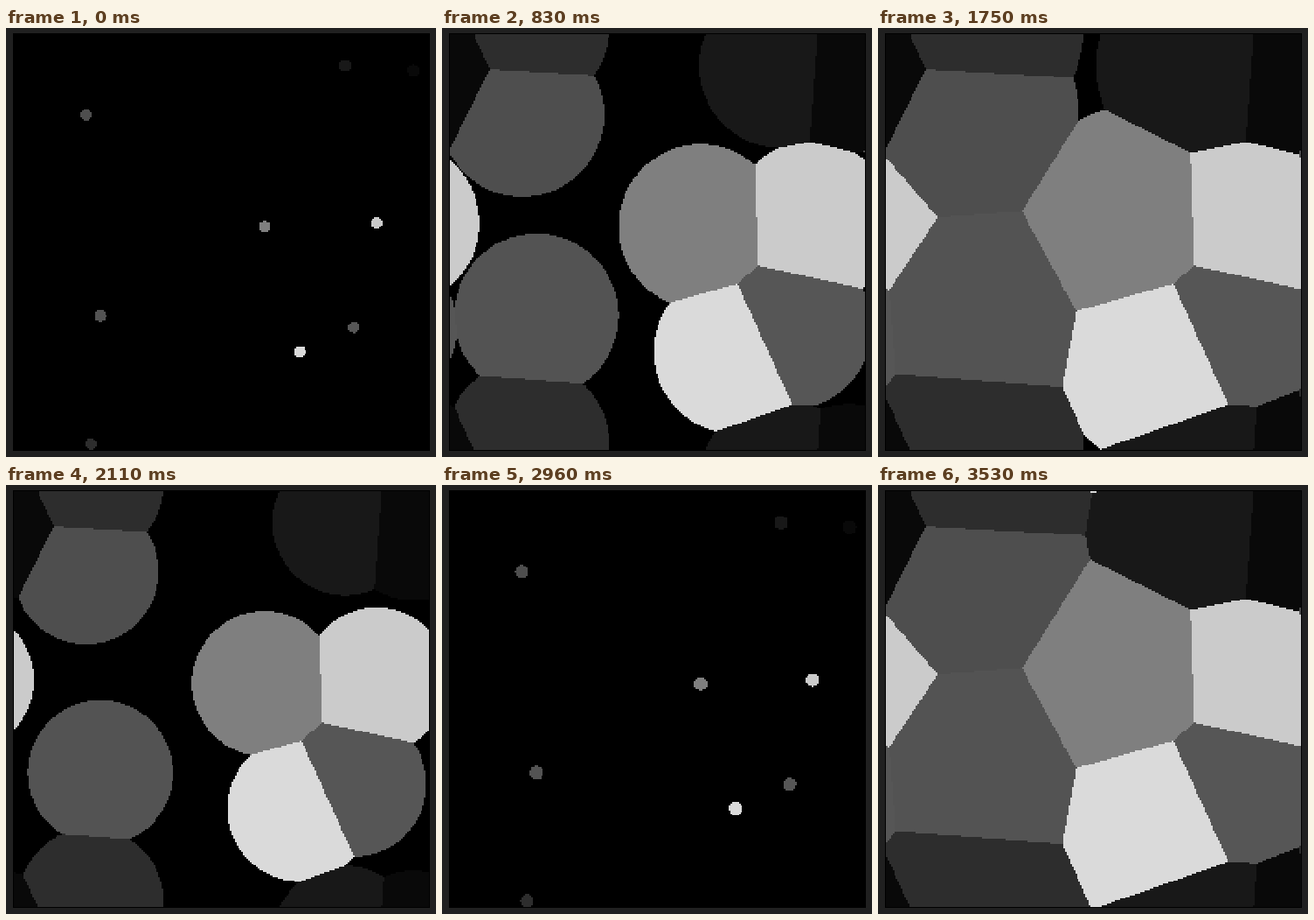
Animation, 492 px wide and 490 px high, one loop 3.89 s. Source, as an HTML page with a canvas:

```html
<!DOCTYPE html>
<html lang="en">
<head>
<meta charset="utf-8">
<title>Growing cells on a torus</title>
<style>
  html, body { margin: 0; width: 100%; height: 100%; overflow: hidden; background: #202020; }
  canvas {
    position: absolute; left: 8px; top: 6px; width: 475px; height: 475px;
    border: 1px solid #000; background: #000; image-rendering: pixelated;
  }
</style>
</head>
<body>
<canvas id="c" width="250" height="250"></canvas>
<script>
const N = 250, SIZE = 475, CELL = SIZE / N, LOOP = 3890, FULL = 160;

// x, y, grey level
const sites = [
  [82.6, 91.9, 78], [88.2, 468, 45], [286.8, 219.8, 127],
  [414.8, 215.8, 203], [388.8, 334.8, 86], [327.2, 362.8, 218],
  [99, 321.8, 83], [379, 36, 24], [457, 41.5, 9]
];

const ctx = document.getElementById('c').getContext('2d');
const image = ctx.createImageData(N, N);
const dist = new Float32Array(N * N);
const grey = new Uint8Array(N * N);

const wrap = d => Math.min(Math.abs(d), SIZE - Math.abs(d));
const lerp = (a, b, k) => a + (b - a) * k;
const snap = (t, from) => from + Math.floor((t - from) / 30) * 30;

// Nearest site and its distance, with wrapped edges
for (let i = 0; i < N * N; i++) {
  const x = (i % N + 0.5) * CELL;
  const y = (Math.floor(i / N) + 0.5) * CELL;
  dist[i] = Infinity;
  for (const [sx, sy, level] of sites) {
    const d = Math.hypot(wrap(x - sx), wrap(y - sy));
    if (d < dist[i]) {
      dist[i] = d;
      grey[i] = level;
    }
  }
}

function radius(t) {
  if (t < 40) return 6.5;
  if (t < 1110) {
    const s = snap(t, 590);
    return 6.5 + 0.0406 * s + 7.8e-5 * s * s;
  }
  if (t < 1750) return FULL;
  if (t < 2760) {
    const s = snap(t, 1750);
    if (s < 2260) return lerp(138, 60, (s - 1750) / 510);
    if (s < 2410) return lerp(60, 32.7, (s - 2260) / 150);
    return 32.7 * Math.pow((2760 - s) / 350, 1.5);
  }
  if (t < 2960) return 0;
  if (t < 3530) return 0.253 * (snap(t, 2960) - 2930);
  return FULL;
}

let shown = -1;
function draw(r) {
  if (r === shown) return;
  shown = r;
  const px = image.data;
  for (let i = 0; i < N * N; i++) {
    const v = dist[i] <= r ? grey[i] : 0;
    px[i * 4] = px[i * 4 + 1] = px[i * 4 + 2] = v;
    px[i * 4 + 3] = 255;
  }
  ctx.putImageData(image, 0, 0);
}

const start = performance.now();
function tick() {
  draw(radius((performance.now() - start) % LOOP));
  requestAnimationFrame(tick);
}
tick();
</script>
</body>
</html>
```
